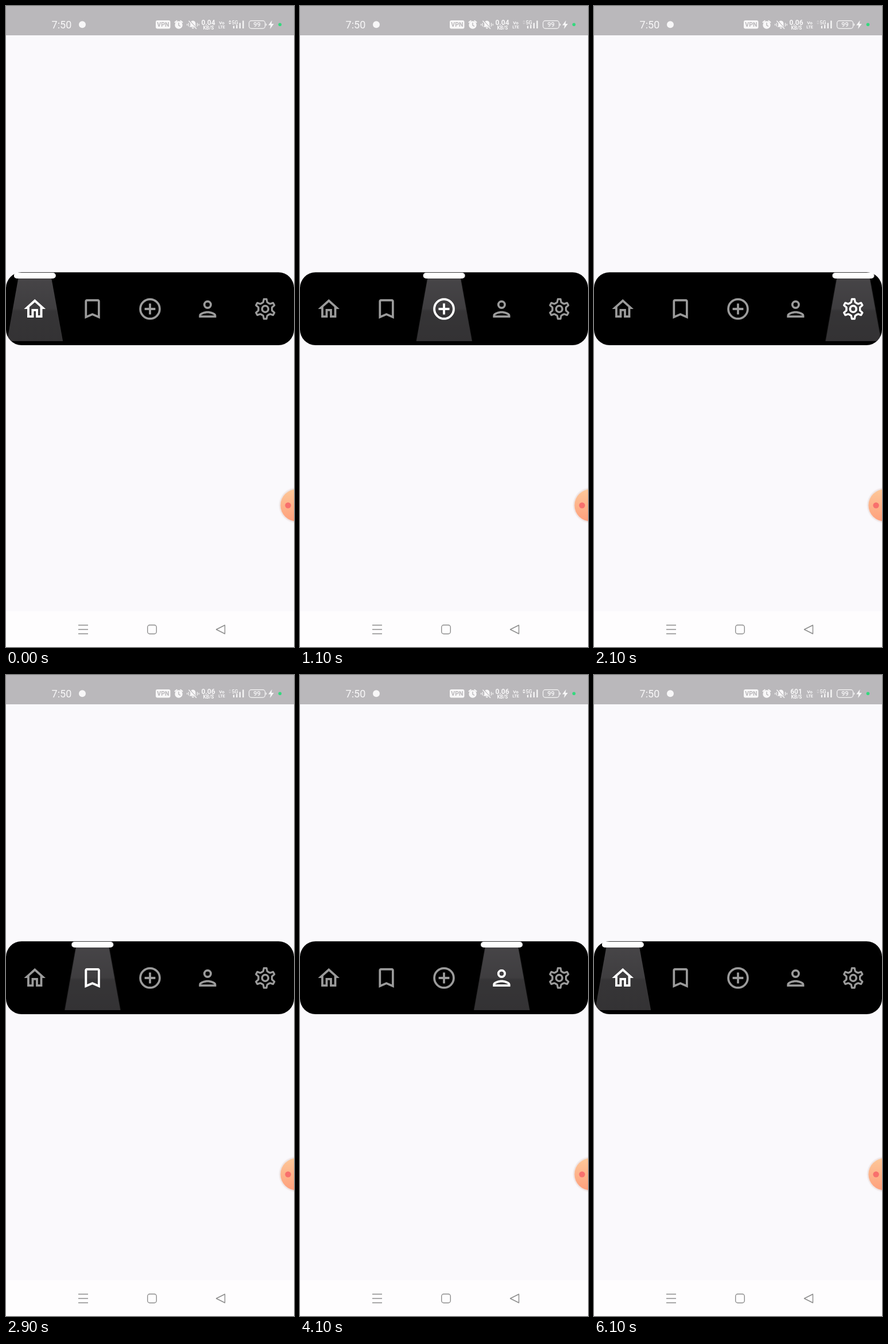
Animation, 502 px wide and 1115 px high, one loop 6700 ms. Source, as an HTML page without scripts:

```html
<!DOCTYPE html>
<html lang="en">
<head>
<meta charset="utf-8">
<title>Spotlight tab bar</title>
<style>
html, body { margin: 0; width: 100%; height: 100%; overflow: hidden; background: #faf9fc; }
svg { display: block; width: 100%; height: 100%; }
text { font-family: Roboto, Inter, sans-serif; font-weight: 500; }
.mid { text-anchor: middle; }
.bold { font-weight: 700; }
.line { fill: none; stroke: currentColor; }
.cut { fill: none; stroke: #bab8bb; }

.spot, .low, .mean, .high, .arrows { animation: 6.7s step-end infinite; }
.spot { animation-name: spot; }
.low { animation-name: low; }
.mean { animation-name: mean; }
.high { animation-name: high; }
.arrows { animation-name: arrows; }

/* one tab is 100.4px wide */
@keyframes spot {
  0%, 74.627% { transform: translateX(0); }
  2.985%, 43.284% { transform: translateX(100.4px); }
  14.925%, 55.224% { transform: translateX(200.8px); }
  23.881%, 59.701% { transform: translateX(301.2px); }
  29.851% { transform: translateX(401.6px); }
}
@keyframes low { 0% { opacity: 1; } 23.881%, 100% { opacity: 0; } }
@keyframes mean { 0%, 83.582% { opacity: 0; } 23.881% { opacity: 1; } }
@keyframes high { 0% { opacity: 0; } 83.582%, 100% { opacity: 1; } }
@keyframes arrows { 0%, 59.701% { opacity: 1; } 14.925%, 89.552% { opacity: .3; } }
</style>
</head>
<body>
<svg viewBox="0 0 502 1115">
  <defs>
    <linearGradient id="beam" x2="0" y2="1">
      <stop offset="0" stop-color="#fcf6ff" stop-opacity=".28"/>
      <stop offset=".48" stop-color="#fcf6ff" stop-opacity=".25"/>
      <stop offset=".52" stop-color="#fcf6ff" stop-opacity=".215"/>
      <stop offset="1" stop-color="#fcf6ff" stop-opacity=".205"/>
    </linearGradient>
    <linearGradient id="peach" x2="0" y2="1">
      <stop offset="0" stop-color="#fdc899"/>
      <stop offset="1" stop-color="#fe9f7c"/>
    </linearGradient>
    <clipPath id="lit"><rect class="spot" y="476" width="100.4" height="106"/></clipPath>

    <path id="tooth" d="M-3.14-5.44L-1.85-6.2L-1.25-9.15H1.25L1.85-6.2L3.14-5.44"/>
    <g id="icons" fill="currentColor" fill-rule="evenodd">
      <path transform="translate(50.2 527) scale(1.88) translate(-12 -12)" d="M12 5.69l5 4.5V18h-2v-6H9v6H7v-7.81zM12 3L2 12h3v8h6v-6h2v6h6v-8h3z"/>
      <path transform="translate(150.6 527) scale(1.88) translate(-12 -12)" d="M17 3H7c-1.1 0-2 .9-2 2v16l7-3 7 3V5c0-1.1-.9-2-2-2zm0 15l-5-2.18L7 18V5h10z"/>
      <g transform="translate(251 527) scale(1.88)" class="line" stroke-width="2">
        <circle r="9"/>
        <path d="M-5 0H5M0-5V5"/>
      </g>
      <g transform="translate(351.4 527) scale(1.88)">
        <circle cy="-4" r="3" class="line" stroke-width="2"/>
        <path d="M0 2C-2.67 2-8 3.34-8 6v2H8V6C8 3.34 2.67 2 0 2zm0 2c2.7 0 5.8 1.29 6 2H-6c.23-.72 3.31-2 6-2z"/>
      </g>
      <g transform="translate(451.8 527) scale(1.88)" class="line" stroke-width="1.7" stroke-linejoin="round" stroke-linecap="round">
        <use href="#tooth"/>
        <use href="#tooth" transform="rotate(60)"/>
        <use href="#tooth" transform="rotate(120)"/>
        <use href="#tooth" transform="rotate(180)"/>
        <use href="#tooth" transform="rotate(240)"/>
        <use href="#tooth" transform="rotate(300)"/>
        <circle r="2.9" stroke-width="1.9"/>
      </g>
    </g>
  </defs>

  <rect width="502" height="1115" fill="#faf9fc"/>

  <!-- status bar -->
  <rect width="502" height="51" fill="#bab8bb"/>
  <g fill="#f8f7f8" color="#f8f7f8">
    <text x="79.6" y="38.5" font-size="18" style="font-weight:400">7:50</text>
    <circle cx="133" cy="32.3" r="6"/>

    <rect x="261" y="25" width="25.5" height="14.5" rx="3"/>
    <text x="273.8" y="36.2" font-size="10.5" class="mid bold" fill="#bab8bb" style="fill:#bab8bb">VPN</text>

    <circle cx="301" cy="33" r="6.7"/>
    <path class="line" stroke-width="2" stroke-linecap="round" d="M294.5 28.3l3.2-2.6M307.5 28.3l-3.2-2.6"/>
    <path class="cut" stroke-width="1.4" d="M301 29v4.5l3 1.8"/>

    <path d="M319.5 36.5l1.7-2v-4.2c0-2.6 1.6-4.3 4.6-4.8 3 .5 4.6 2.2 4.6 4.8v4.2l1.7 2zM323.8 37.5h4a2 2 0 0 1-4 0z"/>
    <path class="line" stroke-width="1.2" d="M318.3 29.5v6M315.7 31v3M333.5 29.5v6M336.2 31v3"/>
    <path class="cut" stroke-width="1.5" d="M319.5 25l13 14"/>
    <path class="line" stroke-width="1.4" d="M318.5 25.8l13.5 14"/>

    <g class="mid bold">
      <text class="low bold" x="352.5" y="33" font-size="12">0.04</text>
      <text class="mean bold" x="352.5" y="33" font-size="12">0.06</text>
      <text class="high bold" x="352.5" y="33" font-size="12">601</text>
      <text class="bold" x="353" y="41" font-size="8.4">KB/S</text>
      <text class="bold" x="376" y="31.6" font-size="8">Vo</text>
      <text class="bold" x="376" y="39.4" font-size="7">LTE</text>
    </g>

    <path class="arrows" d="M387.8 27.6l2.5-2.9 2.5 2.9zM387.8 29.2l2.5 2.9 2.5-2.9z"/>
    <text x="393.5" y="31.6" font-size="9">5G</text>
    <path class="line" stroke-width="2.3" d="M397 39v-4.5M402.3 39v-6M407.8 39V29.5M413.4 39V25.5"/>

    <rect class="line" x="423.6" y="25.7" width="28" height="13.4" rx="4" stroke-width="1.2"/>
    <path d="M452.8 30.3q1.5 0 1.5 2.1t-1.5 2.1z"/>
    <text class="mid" x="437.6" y="36.3" font-size="11">99</text>
    <path d="M463.6 25l-6.3 8.6h4l-1.2 6.4 6.8-9h-4.2z"/>
  </g>
  <circle cx="477.5" cy="32.2" r="2.8" fill="#35d87e"/>

  <!-- tab bar -->
  <rect y="463.3" width="502" height="126.7" rx="27"/>
  <g class="spot">
    <path d="M21.3 474H79.3L99.2 583H1.8z" fill="url(#beam)"/>
    <rect x="13.8" y="464" width="73" height="10" rx="5" fill="#fff"/>
  </g>
  <use href="#icons" color="#9b9b9b"/>
  <g clip-path="url(#lit)"><use href="#icons" color="#fff"/></g>

  <!-- floating button -->
  <circle cx="506.5" cy="868.5" r="31" fill="#f3eeef"/>
  <circle cx="506.5" cy="868.5" r="29.5" fill="#eee2e0"/>
  <circle cx="506.5" cy="868.5" r="28" fill="url(#peach)"/>
  <circle cx="491.6" cy="868.6" r="5.2" fill="#f8706d"/>

  <!-- system navigation -->
  <rect y="1052.5" width="502" height="62.5" fill="#fefdfe"/>
  <g class="line" color="#8c8c8c" stroke-width="1.4" stroke-linejoin="round">
    <path d="M126 1077H143M126 1084.5H143M126 1092H143"/>
    <rect x="246.7" y="1076.7" width="15.6" height="15.6" rx="4"/>
    <path d="M381.5 1077V1092L366.5 1084.5z"/>
  </g>
</svg>
</body>
</html>
```
